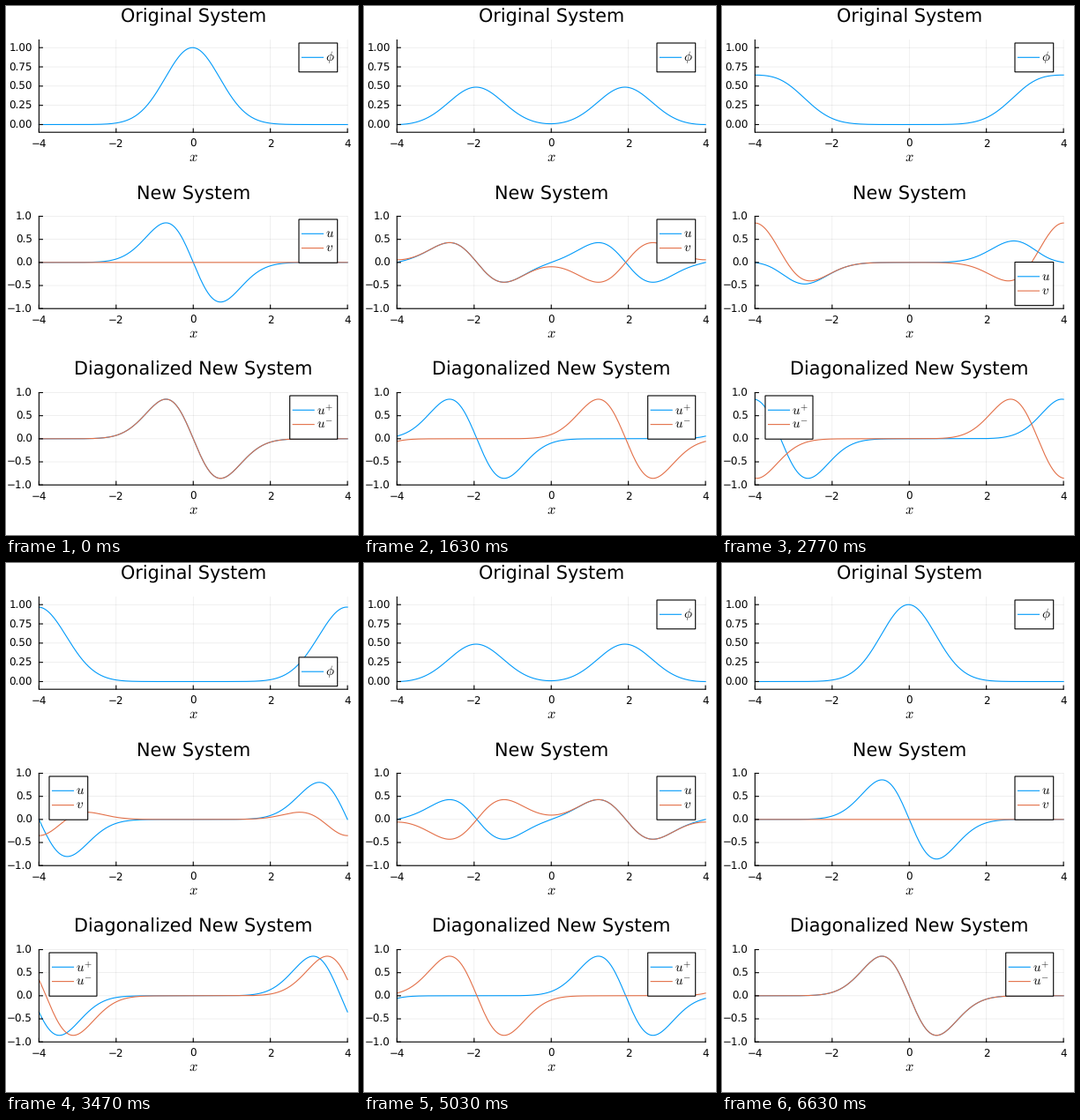
Recreate the animation shown at these times as a matplotlib script. Size 399 px wide and 600 px high, loop 6660 ms.

```python
import numpy as np
import matplotlib.pyplot as plt
from matplotlib.animation import FuncAnimation
from matplotlib.patches import Rectangle

W, H, DPI = 399, 600, 100
FRAMES, LOOP_MS = 200, 6660
BLUE, RED = "#009AFA", "#E36F47"
PERIOD = 8.0
LEFT, RIGHT = 37.4, 387.1
TOP, HEIGHT = 38.5, 104.7

plt.rcParams["font.family"] = "DejaVu Sans"
plt.rcParams["mathtext.fontset"] = "cm"
plt.rcParams["text.hinting"] = "none"
plt.rcParams["path.snap"] = False

fig = plt.figure(figsize=(W / DPI, H / DPI), dpi=DPI, facecolor="white")
ax = fig.add_axes([0, 0, 1, 1])
ax.set_xlim(0, W)
ax.set_ylim(H, 0)
ax.axis("off")

x = np.linspace(-4, 4, 200)
dx = x[1] - x[0]


def pt(px):
    return px * 72 / DPI


def stroke(xs, ys, color="black", width=1.1, **kw):
    return ax.plot(xs, ys, color=color, lw=pt(width), **kw)[0]


def label(px, py, text, size, ha="center", **kw):
    return ax.text(px, py, text, fontsize=pt(size), ha=ha, va="baseline", **kw)


def to_x(v):
    return LEFT + (np.asarray(v) + 4) / 8 * (RIGHT - LEFT)


def wave(center):
    """Slope of a unit Gaussian, repeated with the period."""
    s = x - center - PERIOD * np.arange(-2, 3)[:, None]
    return np.sum(-2 * s * np.exp(-s**2), axis=0)


def fields(shift):
    plus, minus = wave(-shift), wave(shift)
    u, v = (plus + minus) / 2, (plus - minus) / 2
    # phi is recovered from its slope by a running sum, lowest point at zero
    phi = np.cumsum(u) * dx
    return [phi - phi.min()], [u, v], [plus, minus]


class Panel:
    def __init__(self, top, title, ylim, ticks, fmt, names, box_w):
        self.top, self.ylim = top, ylim
        self.box_w, self.box_h = box_w, 16.4 * (len(names) + 1)
        bottom = top + HEIGHT
        label((LEFT + RIGHT) / 2, top - 20.2, title, 20.8)
        label((LEFT + RIGHT) / 2, bottom + 32.6, "$x$", 16.5)

        for v in range(-4, 5, 2):
            px = to_x(v)
            stroke([px, px], [top, bottom], alpha=0.1, width=0.6, zorder=1)
            stroke([px, px], [bottom, bottom - 4], zorder=4)
            label(px, bottom + 16.3, f"{v}".replace("-", "\u2212"), 11.9)
        for v in ticks:
            py = self.to_y(v)
            stroke([LEFT, RIGHT], [py, py], alpha=0.1, width=0.6, zorder=1)
            stroke([LEFT, LEFT + 4], [py, py], zorder=4)
            text = format(v, fmt).replace("-", "\u2212")
            label(29.8, py + 4.3, text, 11.9, ha="right")
        stroke([LEFT, LEFT, RIGHT], [top, bottom, bottom], zorder=4,
               solid_joinstyle="miter")

        colors = (BLUE, RED)[:len(names)]
        self.curves = [stroke([], [], c, zorder=3) for c in colors]
        self.box = ax.add_patch(Rectangle((0, 0), box_w, self.box_h, fc="white",
                                          ec="black", lw=pt(1.1), zorder=5))
        self.keys = [stroke([], [], c, zorder=6) for c in colors]
        self.names = [label(0, 0, n, 15, ha="left", zorder=6) for n in names]

    def to_y(self, v):
        lo, hi = self.ylim
        return self.top + (hi - np.asarray(v)) / (hi - lo) * HEIGHT

    def best_corner(self, series):
        """Least crowded corner; ties go to the first one listed."""
        corners = [(1, 1), (0, 1), (1, 0), (0, 0)]
        lo, hi = self.ylim
        sx = (x + 4) / 8
        crowd = []
        for cx, cy in corners:
            total = 0
            for y in series:
                gap_x, gap_y = abs(sx - cx), abs((y - lo) / (hi - lo) - cy)
                near = (gap_x <= 0.25) & (gap_y <= 0.25)
                total += np.sum(near / (1 + 100 * (gap_x**2 + gap_y**2)))
            crowd.append(total)
        best = min(crowd)
        return next(c for c, n in zip(corners, crowd) if np.isclose(n, best))

    def place_legend(self, corner):
        right, upper = corner
        bx = RIGHT - 11.4 - self.box_w if right else LEFT + 11.6
        by = self.top + 3.5 if upper else self.top + HEIGHT - 3.5 - self.box_h
        self.box.set_xy((bx, by))
        for i, (key, name) in enumerate(zip(self.keys, self.names)):
            py = by + 16.3 * (i + 1)
            key.set_data([bx + 3.5, bx + 27.5], [py, py])
            drop = 3.7
            if "^" in name.get_text():
                drop = 5.1 if "+" in name.get_text() else 4.1
            name.set_position((bx + 30.3, py + drop))

    def update(self, series):
        for curve, y in zip(self.curves, series):
            curve.set_data(to_x(x), self.to_y(y))
        self.place_legend(self.best_corner(series))


HALVES = (-1, -0.5, 0, 0.5, 1)
panels = [
    Panel(TOP, "Original System", (-0.1, 1.1), (0, 0.25, 0.5, 0.75, 1),
          ".2f", [r"$\phi$"], 43.7),
    Panel(TOP + 200, "New System", (-1, 1), HALVES, ".1f",
          ["$u$", "$v$"], 43.7),
    Panel(TOP + 400, "Diagonalized New System", (-1, 1), HALVES, ".1f",
          ["$u^{+}$", "$u^{-}$"], 54),
]


def draw(i):
    for panel, series in zip(panels, fields(PERIOD * i / (FRAMES - 1))):
        panel.update(series)
    return []


anim = FuncAnimation(fig, draw, frames=FRAMES, init_func=lambda: draw(0),
                     interval=LOOP_MS / FRAMES, repeat=True, repeat_delay=0)
plt.show()
```
